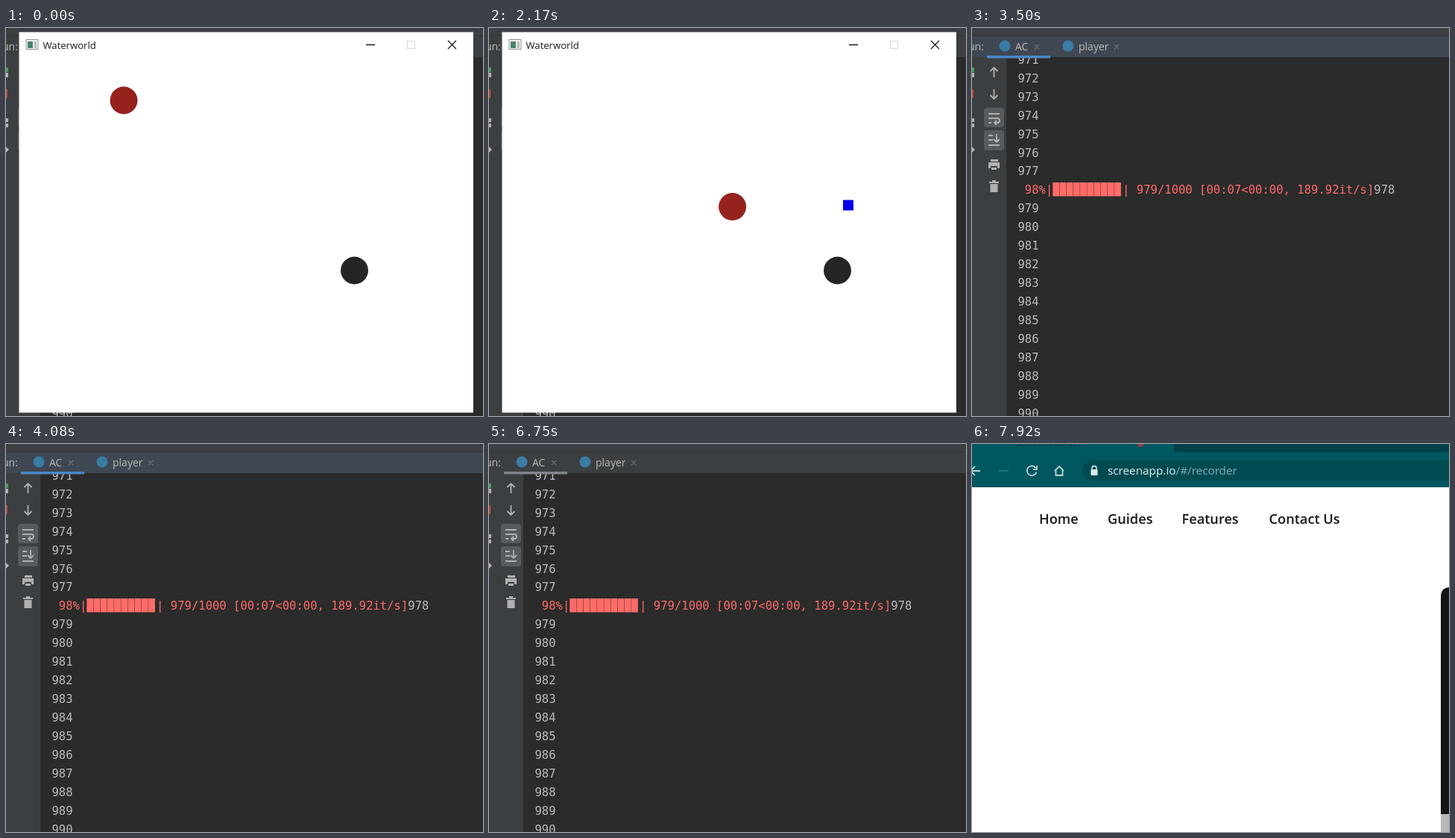
An HTML page that plays this animation: 640x520 px, repeating every 8010 ms.

```html
<!DOCTYPE html>
<html lang="en">
<head>
<meta charset="utf-8">
<title>Training run</title>
<style>
  html, body { margin: 0; width: 100%; height: 100%; overflow: hidden; background: #2b2b2b; }
  svg { display: block; width: 640px; height: 520px; }
  text { white-space: pre; }
  .ui { font-family: "Open Sans", "Noto Sans", sans-serif; }
  .mono { font: 15.57px "DejaVu Sans Mono", "Noto Sans Mono", monospace; }
  .line { fill: none; stroke-width: 1.8; }
</style>
</head>
<body>
<svg viewBox="0 0 640 520" xmlns="http://www.w3.org/2000/svg">
  <g id="console">
    <rect width="640" height="520" fill="#2b2b2b"/>
    <rect width="46" height="520" fill="#3c3f41"/>
    <g id="rows" class="mono" fill="#bbbbbb"></g>
    <g id="bar" fill="#ff6b68"></g>
    <rect width="640" height="39" fill="#3c3f41"/>
    <rect id="header" y="11" width="640" height="28" fill="#3f4753"/>
    <rect y="10" width="640" height="1" fill="#323232"/>
    <rect id="underline" x="20" y="37" width="85" height="3.5"/>
    <g class="ui" font-size="14" fill="#bbbbbb">
      <text x="-5" y="30">un:</text>
      <text x="58" y="30">AC</text>
      <text x="143" y="30">player</text>
    </g>
    <circle cx="44" cy="24" r="7.5" fill="#3b7ca4"/>
    <circle cx="129" cy="24" r="7.5" fill="#3b7ca4"/>
    <path class="line" stroke="#6e7072" style="stroke-width:1.2" d="M84 22l6 6m0-6l-6 6M191 22l6 6m0-6l-6 6"/>
    <rect x="-4" y="53" width="7" height="6" fill="#499c54"/>
    <rect x="-4" y="60" width="7" height="6" fill="#afb1b3"/>
    <rect x="-4" y="82" width="6" height="12" fill="#b8483f"/>
    <path fill="#afb1b3" d="M0 121h3v5H0zM0 128h3v5H0zM0 159l4 4-4 4z"/>
    <rect x="16" y="107" width="27" height="26" rx="4" fill="#575b5e"/>
    <rect x="16" y="137" width="27" height="27" rx="4" fill="#575b5e"/>
    <g class="line" stroke="#afb1b3">
      <path d="M29.5 66V53m-5 5l5-5 5 5M29.5 82v13m-5-5l5 5 5-5"/>
      <path d="M22 115h15M22 121h12a3 3 0 0 1 0 6h-4m3-3l-3 3 3 3M22 127h4"/>
      <path d="M22 144h6M22 150h6M22 157h15M33 142v11m-4-4l4 4 4-4"/>
    </g>
    <path fill="#afb1b3" d="M25 176h10v3H25zM22 180h15v8h-3v-3H25v3h-3zM26 187h7v3h-7zM23 206h4v-2h5v2h4v2H23zM24.5 209h10v11h-10z"/>
  </g>

  <g id="game">
    <rect x="17.5" y="5.5" width="609.5" height="510" fill="#ffffff"/>
    <rect x="27" y="15.5" width="16" height="13" fill="#f6f6f6" stroke="#8f9090"/>
    <rect x="29" y="18" width="7" height="9" fill="#468468"/>
    <rect x="38" y="18" width="3" height="9" fill="#b8bab8"/>
    <text class="ui" x="49.5" y="28" font-size="13.1" fill="#1a1a1a">Waterworld</text>
    <path class="line" stroke="#1a1a1a" style="stroke-width:1.3" d="M483 22.5h12M593 17l11 11m0-11l-11 11"/>
    <rect x="538.5" y="17.5" width="10" height="10" fill="none" stroke="#d6d6d6"/>
    <circle id="agent" r="18.5" fill="#96221e"/>
    <rect id="drifter" y="230.5" width="14" height="14" fill="#0000e6"/>
    <circle cx="467.5" cy="325" r="18.5" fill="#252525"/>
  </g>

  <g id="browser">
    <rect width="640" height="520" fill="#ffffff"/>
    <rect width="640" height="58" fill="#00575f"/>
    <rect x="271" width="369" height="11" fill="#00404a"/>
    <rect x="148" y="22" width="510" height="27" rx="13.5" fill="#004a52"/>
    <text class="ui" x="58" y="3" font-size="12" fill="#063c44">Screen recorder</text>
    <circle cx="226" cy="0" r="4" fill="#9c3c44"/>
    <g class="line" stroke="#b9d6d8">
      <path d="M11 36H-2m6-6l-6 6 6 6"/>
      <path stroke="#267a80" d="M36 36h13"/>
      <path d="M85.5 32a6.5 6.5 0 1 0 1 5.5M87 29v5h-5"/>
      <path d="M111 36l6-6 6 6M112.5 35v7h9v-7"/>
      <path d="M161 35v-2.5a3 3 0 0 1 6 0V35"/>
    </g>
    <rect x="159.5" y="34" width="9" height="8" rx="1" fill="#dce8ea"/>
    <text class="ui" x="182" y="41" font-size="15.3" fill="#e8f2f3">screenapp.io<tspan fill="#82b0b4">/#/recorder</tspan></text>
    <g class="ui" font-size="18.2" font-weight="600" fill="#171717">
      <text x="90" y="107">Home</text>
      <text x="182" y="107">Guides</text>
      <text x="281.5" y="107">Features</text>
      <text x="398.5" y="107">Contact Us</text>
    </g>
    <path d="M629 496V205q0-12 11-13v304z" fill="#141414"/>
    <rect x="629" y="496" width="11" height="24" fill="#b9b9b9"/>
  </g>
</svg>
<script>
const LOOP = 8010;
const CLOSE = 3500, BLUR = 5250, BROWSE = 7330;
const STEP = 160, START = 320;
const CHAR = 9.37, LEFT = 61.5;
const $ = id => document.getElementById(id);
const clamp = (v, max) => Math.max(0, Math.min(max, v));

function add(parent, tag, attrs, text = "") {
  const el = document.createElementNS("http://www.w3.org/2000/svg", tag);
  for (const key in attrs) el.setAttribute(key, attrs[key]);
  el.textContent = text;
  parent.append(el);
}

function buildConsole() {
  const rows = $("rows"), red = "#ff6b68";
  for (let n = 971; n <= 990; n++) {
    const y = 72.8 + (n - 972) * 24.93;
    if (n !== 978) {
      add(rows, "text", { x: LEFT, y }, n);
      continue;
    }
    add(rows, "text", { x: LEFT + CHAR, y, fill: red }, "98%|");
    add(rows, "text", { x: LEFT + 15 * CHAR, y, fill: red }, "| 979/1000 [00:07<00:00, 189.92it/s]");
    add(rows, "text", { x: LEFT + 51 * CHAR, y }, n);
  }
  for (let i = 0; i < 10; i++)
    add($("bar"), "rect", { x: 108.3 + i * 9.2, y: 207, width: 8.8, height: 18.5 });
}

function show(id, on) {
  $(id).setAttribute("display", on ? "inline" : "none");
}

function render(t) {
  // The agent walks on a grid: five cells down, ten right, three down, one right.
  const n = clamp(Math.floor((t - START) / STEP), 19);
  const right = clamp(n - 5, 10) + clamp(n - 18, 1);
  $("agent").setAttribute("cx", 158 + right * 28.1);
  $("agent").setAttribute("cy", 97 + (n - right) * 28.5);
  $("drifter").setAttribute("x", 524 - Math.max(0, n - 5) * 8.17);
  show("drifter", n > 0);

  const focused = t >= CLOSE && t < BLUR;
  show("game", t < CLOSE);
  show("header", focused);
  $("underline").setAttribute("fill", focused ? "#4a88c7" : "#80858a");
  show("browser", t >= BROWSE);
}

buildConsole();
const begin = performance.now();
function tick() {
  render((performance.now() - begin) % LOOP);
  requestAnimationFrame(tick);
}
tick();
</script>
</body>
</html>
```
